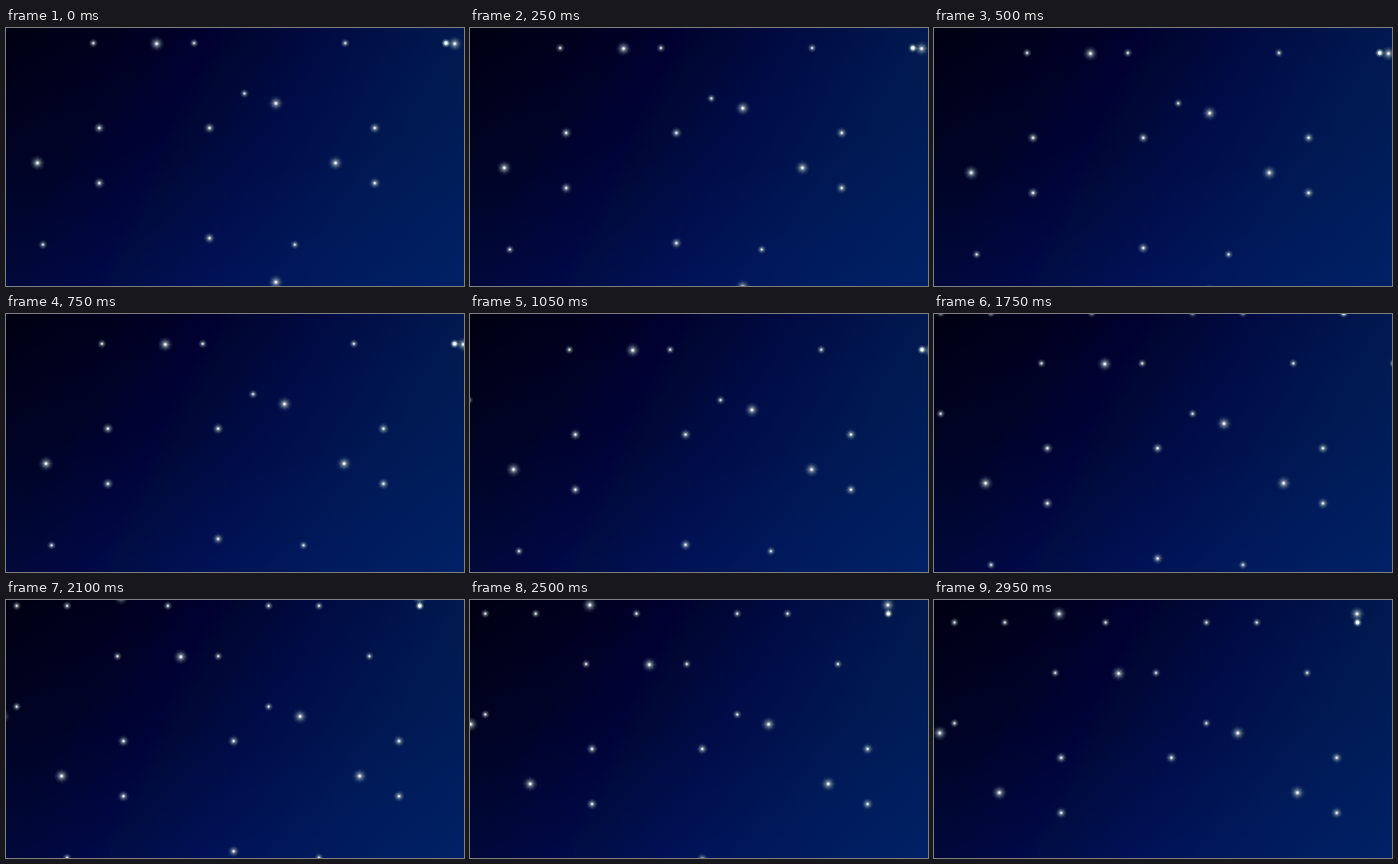
These frames come from a looping animation (600x338 px, 3000 ms). An HTML page with a canvas:

```html
<!DOCTYPE html>
<html lang="en">
<head>
<meta charset="utf-8">
<title>Drifting stars</title>
<style>
  html, body { margin: 0; width: 100%; height: 100%; overflow: hidden; background: #000014; }
  canvas {
    display: block; width: 600px; height: 338px;
    background:
      linear-gradient(transparent, rgba(0, 40, 150, .08) 50%, rgba(0, 40, 150, .22)),
      linear-gradient(116deg, #000012, #00001e 20%, #000030 36%, #00062f 40%, #000a42 54%, #00184e 77%, #001f58);
  }
</style>
</head>
<body>
<canvas id="sky" width="600" height="338"></canvas>
<script>
const ctx = document.getElementById('sky').getContext('2d');
const LOOP = 3000, STEP = 50;
const DX = 0.753, DY = 1.282; // drift per step

// Stars sit on a square grid; the pattern of [column, row] cells repeats every `cols` columns
const layers = [
  { size: 6.5, pitch: 66, x: -17.6, y: 19.8, cols: 5,
    cells: [[0, -1], [1, -1], [3, -1], [2, 0], [4, 0], [0, 1], [1, 4]] },
  { size: 6.5, pitch: 66, x: -17.6, y: 19.8, cols: 10, cells: [[8, -1], [9, 0]] },
  { size: 8.2, pitch: 72.2, x: 122.2, y: 131, cols: 5,
    cells: [[0, 0], [2, 0], [0, 1], [2, 2]] },
  { size: 10.5, pitch: 78.1, x: -36.9, y: 20.6, cols: 5,
    cells: [[2, -1], [3, 0], [0, 1], [1, 2], [5, 4]] }
];

function makeStar(size) {
  const c = document.createElement('canvas'), g = c.getContext('2d');
  c.width = c.height = 24;
  g.translate(12, 12);
  const disc = (r, stops) => {
    const fill = g.createRadialGradient(0, 0, 0, 0, 0, r);
    stops.forEach(([p, color]) => fill.addColorStop(p, color));
    g.fillStyle = fill;
    g.fillRect(-12, -12, 24, 24);
  };
  disc(size, [[0, 'rgba(215,222,222,.85)'], [.35, 'rgba(170,188,190,.5)'],
    [.65, 'rgba(115,145,150,.2)'], [1, 'rgba(80,120,130,0)']]);
  g.strokeStyle = 'rgba(200,215,215,.12)';
  g.lineWidth = .8;
  for (let i = 0; i < 8; i++) {
    g.beginPath();
    g.moveTo(0, 0);
    g.lineTo(0, size * .75);
    g.stroke();
    g.rotate(Math.PI / 4);
  }
  disc(size * .27, [[0, '#fff'], [.3, 'rgba(255,255,255,.85)'], [1, 'rgba(255,255,255,0)']]);
  return c;
}

layers.forEach(layer => layer.star = makeStar(layer.size));
ctx.globalCompositeOperation = 'lighter';
const start = performance.now();

function draw() {
  const k = Math.floor((performance.now() - start) % LOOP / STEP);
  ctx.clearRect(0, 0, 600, 338);
  for (const { star, pitch, x, y, cols, cells } of layers)
    for (const [col, row] of cells)
      for (let px = x + col * pitch; px < 612; px += cols * pitch)
        ctx.drawImage(star, px + k * DX - 12, y + row * pitch + k * DY - 12);
  requestAnimationFrame(draw);
}
draw();
</script>
</body>
</html>
```
